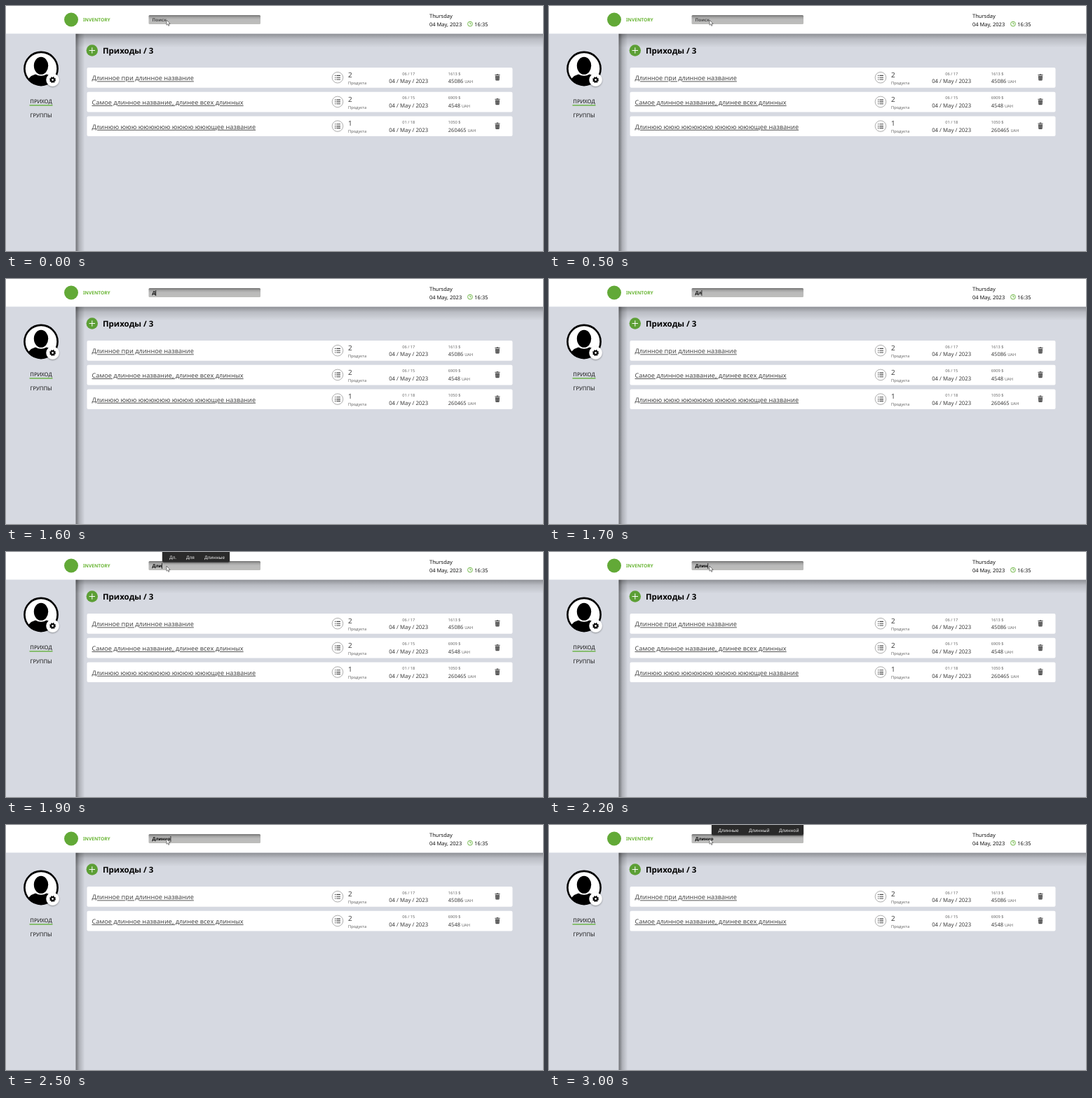
Animation of 766x350 px, one loop 3100 ms. Source, as an HTML page:

```html
<!DOCTYPE html>
<html lang="ru">
<head>
<meta charset="utf-8">
<title>Inventory</title>
<style>
  html, body { margin: 0; width: 100%; height: 100%; overflow: hidden; background: #d6d9e1; }
  svg { display: block; }
  text {
    font: 7.5px "Noto Sans", "Open Sans", sans-serif;
    fill: #111;
    text-rendering: geometricPrecision;
    white-space: pre;
  }
  .middle { text-anchor: middle; }
  .nav { font-size: 7.6px; }
  .brand { font-size: 6.6px; font-weight: 700; fill: #69b534; }
  .heading { font-size: 11.5px; font-weight: 700; fill: #000; }
  .field { font-size: 6.4px; font-weight: 700; fill: #000; }
  .hint { fill: #4c4c4c; }
  .name { font-size: 9.15px; fill: #484848; text-decoration: underline; text-decoration-thickness: .7px; text-underline-offset: 1.2px; }
  .count { font-size: 10px; fill: #444; }
  .date { font-size: 7.8px; fill: #3c3c3c; }
  .sum { fill: #3c3c3c; }
  .small { font-size: 5.7px; fill: #666; }
  .popup text { font-size: 6.45px; fill: #f2f2f2; }
</style>
</head>
<body>
<svg width="766" height="350" viewBox="0 0 766 350">
  <defs>
    <linearGradient id="fadeDown" x2="0" y2="1">
      <stop offset="0" stop-color="#000" stop-opacity=".34"/>
      <stop offset=".4" stop-color="#000" stop-opacity=".13"/>
      <stop offset="1" stop-color="#000" stop-opacity="0"/>
    </linearGradient>
    <linearGradient id="fadeRight">
      <stop offset="0" stop-color="#000" stop-opacity=".48"/>
      <stop offset=".4" stop-color="#000" stop-opacity=".18"/>
      <stop offset="1" stop-color="#000" stop-opacity="0"/>
    </linearGradient>
    <linearGradient id="sunken" x2="0" y2="1">
      <stop offset="0" stop-color="#747474"/>
      <stop offset=".28" stop-color="#a9a9a8"/>
      <stop offset=".5" stop-color="#bababa"/>
      <stop offset="1" stop-color="#bdbdbb"/>
    </linearGradient>
    <filter id="soft" x="-30%" y="-30%" width="160%" height="170%">
      <feDropShadow dx="0" dy="1" stdDeviation="1.3" flood-opacity=".4"/>
    </filter>
    <clipPath id="face"><circle cx="50" cy="89.5" r="23"/></clipPath>
    <g id="listIcon">
      <circle r="7.8" fill="#fff" stroke="#999" stroke-width=".8"/>
      <path d="M-4-2.8h1.3M-4 0h1.3M-4 2.8h1.3M-1.6-2.8H4M-1.6 0H4M-1.6 2.8H4" stroke="#444" stroke-width="1.1"/>
    </g>
    <g id="trash" fill="#505050">
      <path d="M-3.6-3.7h2l.6-.9h2l.6.9h2v1h-7.2zM-3.1-2H3.1L2.7 4q-.1.8-.9.8h-3.6q-.8 0-.9-.8z"/>
      <path d="M-1.2-.9V3.6M1.2-.9V3.6" stroke="#bbb" stroke-width=".5"/>
    </g>
  </defs>

  <rect width="766" height="350" fill="#d6d9e1"/>
  <rect x="99.5" y="39.5" width="667" height="20" fill="url(#fadeDown)"/>
  <rect x="99.5" y="39.5" width="13" height="311" fill="url(#fadeRight)"/>
  <rect width="766" height="39.5" fill="#fff"/>

  <circle cx="93" cy="19.5" r="10" fill="#62a937"/>
  <text class="brand" x="110" y="21.8">INVENTORY</text>
  <text x="604" y="17">Thursday</text>
  <text x="604" y="29.2">04 May, 2023</text>
  <g fill="none" stroke="#62b136" stroke-width=".9">
    <circle cx="662" cy="25.6" r="3.4"/>
    <path d="M662 23.4v2.3h1.8"/>
  </g>
  <text x="668.3" y="29.2">16:35</text>

  <rect x="203.5" y="13" width="159.5" height="13" rx="1.5" fill="url(#sunken)"/>
  <text id="hint" class="field hint" x="208.5" y="22.3">Поиск</text>
  <text id="typed" class="field" x="208.5" y="22.3"></text>
  <rect id="caret" y="16" width=".8" height="8" fill="#111"/>

  <circle cx="50" cy="89.5" r="23.6" fill="#fff" stroke="#000" stroke-width="2.6"/>
  <g clip-path="url(#face)">
    <ellipse cx="50" cy="85.3" rx="10.2" ry="12.5"/>
    <path d="M29 116q0-15 13-18.5q8 4.5 16 0q13 3.5 13 18.5z"/>
  </g>
  <circle cx="66.5" cy="105.5" r="9.2" fill="#fff" filter="url(#soft)"/>
  <circle cx="66.5" cy="105.5" r="2.5" fill="none" stroke="#000" stroke-width="2.1"/>
  <circle cx="66.5" cy="105.5" r="3.8" fill="none" stroke="#000" stroke-width="1.3" stroke-dasharray="1.7 1.285"/>
  <text class="nav middle" x="50" y="138.8">ПРИХОД</text>
  <rect x="33.5" y="141.2" width="33" height="1.3" fill="#5cae32"/>
  <text class="nav middle" x="50" y="159.1">ГРУППЫ</text>

  <circle cx="122.8" cy="63.5" r="8.2" fill="#5c9f35"/>
  <path d="M118.6 63.5h8.4M122.8 59.3v8.4" stroke="#fff" stroke-width="1"/>
  <text class="heading" x="138" y="68">Приходы / 3</text>

  <g id="rows"></g>
  <g id="popups"></g>
  <path id="pointer" d="M229 20v7.3l1.7-1.5 1.1 2.6 1.2-.5-1.1-2.5h2.2z" fill="#fff" stroke="#333" stroke-width=".6"/>
</svg>
<script>
  const LOOP = 3100;
  const $ = id => document.getElementById(id);

  const receipts = [
    ['Длинное при длинное название', 2, '06 / 17', '1613', '45086'],
    ['Самое длинное название, длинее всех длинных', 2, '06 / 15', '6909', '4548'],
    ['Длинюю ююю юююююю юююю ююющее название', 1, '01 / 18', '1050', '260465']
  ];
  $('rows').innerHTML = receipts.map(([name, count, range, usd, uah], i) => `
    <g transform="translate(0 ${88 + i * 34.7})">
      <rect x="115.5" width="607" height="28.7" rx="2" fill="#fff"/>
      <text class="name" x="122.5" y="18.4">${name}</text>
      <use href="#listIcon" x="473" y="14.2"/>
      <text class="count" x="488" y="14">${count}</text>
      <text class="small" x="488" y="24">Продукта</text>
      <text class="small middle" x="574.2" y="10.7">${range}</text>
      <text class="date middle" x="574.2" y="22.2">04 / May / 2023</text>
      <text class="small" x="630.8" y="10.7">${usd} $</text>
      <text class="sum" x="630.8" y="22.2">${uah} <tspan class="small">UAH</tspan></text>
      <use href="#trash" x="701" y="13.8"/>
    </g>`).join('');

  const popups = [
    { from: 1900, to: 2100, x: 223, width: 96, words: [['Дл.', 233], ['Для', 257], ['Длинные', 283]] },
    { from: 2900, to: LOOP, x: 232, width: 131, words: [['Длинные', 241.5], ['Длинный', 285], ['Длинной', 328]] }
  ];
  $('popups').innerHTML = popups.map(({ x, width, words }) => `
    <g class="popup">
      <rect x="${x}" y="-6" width="${width}" height="20.5" rx="2" fill="#2c2c2c" filter="url(#soft)"/>
      ${words.map(([word, wx]) => `<text x="${wx}" y="9.5">${word}</text>`).join('')}
    </g>`).join('');

  const keyTimes = [1500, 1700, 1800, 2100, 2300, 2500];
  const phrase = 'Длинно';
  const lastRow = $('rows').lastElementChild;

  const show = (element, visible) => { element.style.display = visible ? '' : 'none'; };

  function draw() {
    const t = performance.now() % LOOP;
    const typed = phrase.slice(0, keyTimes.filter(key => t >= key).length);
    if ($('typed').textContent !== typed) $('typed').textContent = typed;
    show($('hint'), !typed);
    show($('caret'), t >= 1200 && t < 3000);
    $('caret').setAttribute('x', 208.5 + (typed ? $('typed').getComputedTextLength() : 0));
    show($('pointer'), t < 1000 || t >= 1800);
    show(lastRow, t < 2300);
    popups.forEach(({ from, to }, i) => show($('popups').children[i], t >= from && t < to));
    requestAnimationFrame(draw);
  }
  draw();
</script>
</body>
</html>
```
